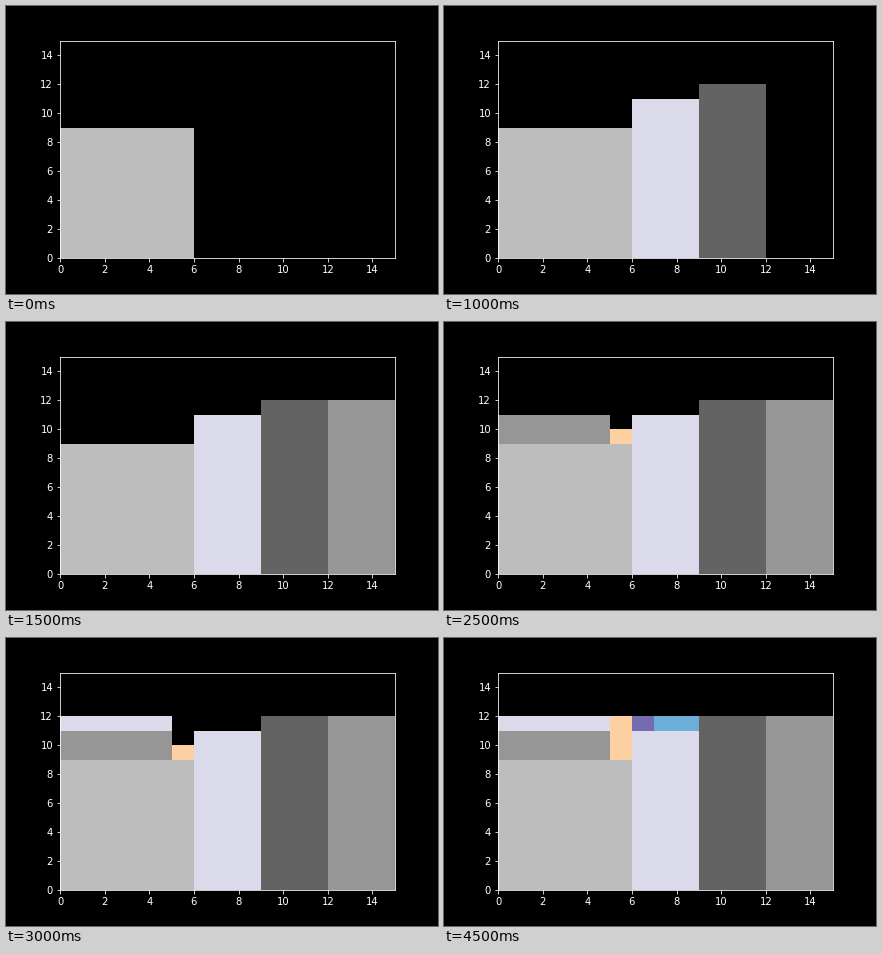
A matplotlib script that plays this animation: 432 px wide and 288 px high, repeating every 5 s.

```python
import matplotlib.pyplot as plt
from matplotlib.animation import FuncAnimation
from matplotlib.patches import Rectangle

STEP_MS = 500
SIZE = 15

# x, y, width, height, colour, in order of placement
BLOCKS = [
    (0, 0, 6, 9, "#bdbdbd"),
    (6, 0, 3, 11, "#dadaeb"),
    (9, 0, 3, 12, "#636363"),
    (12, 0, 3, 12, "#969696"),
    (0, 9, 5, 2, "#969696"),
    (5, 9, 1, 1, "#fdd0a2"),
    (0, 11, 5, 1, "#dadaeb"),
    (5, 10, 1, 2, "#fdd0a2"),
    (6, 11, 1, 1, "#756bb1"),
    (7, 11, 2, 1, "#6baed6"),
]

plt.style.use("dark_background")
plt.rcParams.update({"font.family": "DejaVu Sans", "font.size": 10})

fig = plt.figure(figsize=(6, 4), dpi=72)
fig.subplots_adjust(left=0.125, right=0.9, bottom=0.125, top=0.88)
ax = fig.add_subplot()
ax.set(xlim=(0, SIZE), ylim=(0, SIZE),
       xticks=range(0, SIZE, 2), yticks=range(0, SIZE, 2))

rects = [ax.add_patch(Rectangle((x, y), w, h, facecolor=color, linewidth=0))
         for x, y, w, h, color in BLOCKS]


def update(frame):
    for i, rect in enumerate(rects):
        rect.set_visible(i <= frame)
    return rects


anim = FuncAnimation(fig, update, frames=len(BLOCKS), interval=STEP_MS,
                     repeat=True, repeat_delay=0, blit=False)
plt.show()
```
